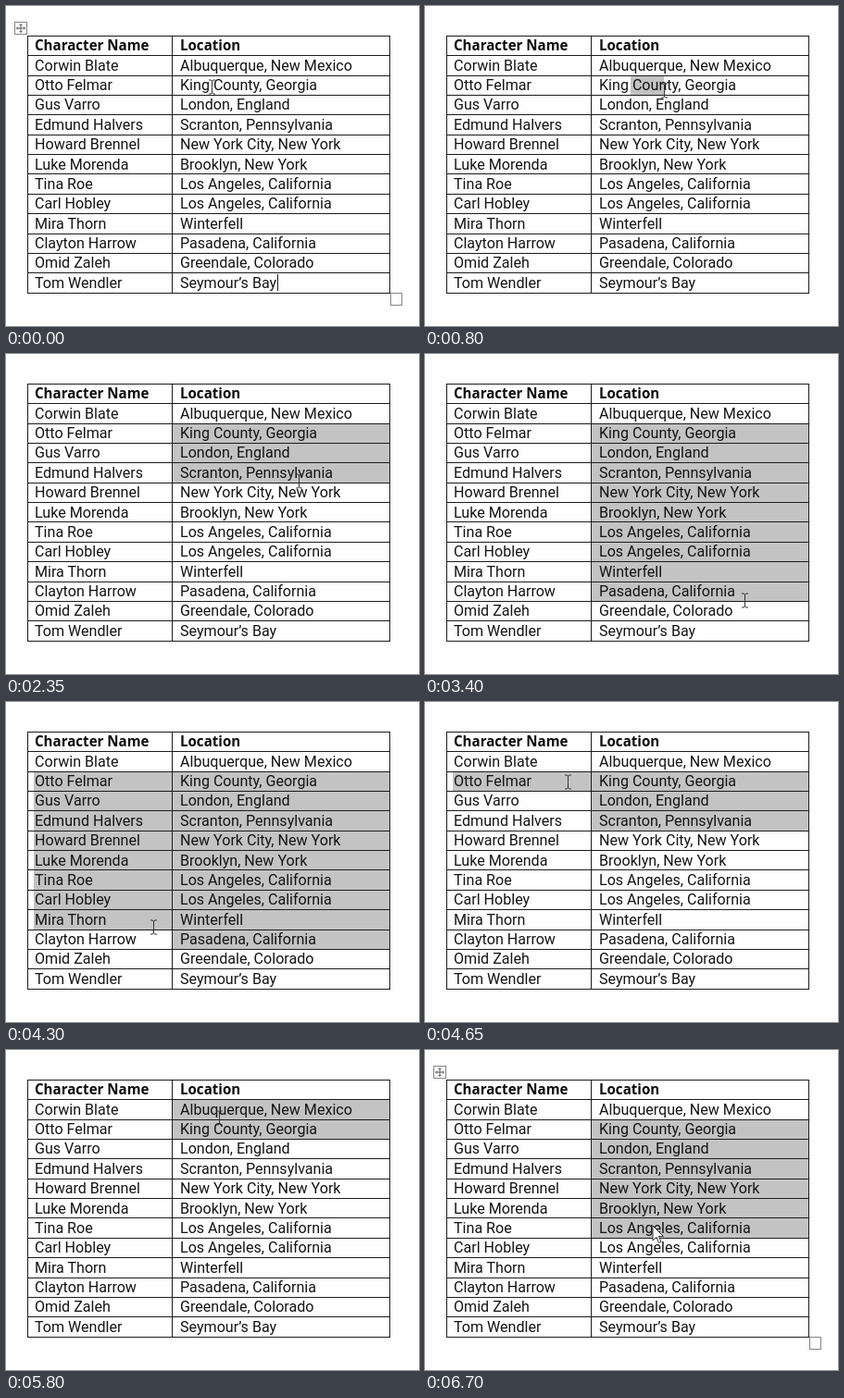
Animation, 446 px wide and 346 px high, one loop 7700 ms. Source, as an HTML page:

```html
<!DOCTYPE html>
<html lang="en">
<head>
<meta charset="utf-8">
<title>Selecting table cells</title>
<style>
  html, body { margin: 0; width: 100%; height: 100%; overflow: hidden; background: #fefefe; }
  svg { display: block; }
  text { font: 16.08px Roboto, "Liberation Sans", sans-serif; fill: #151515; }
  .head { font: 700 15.1px "Open Sans", "Noto Sans", sans-serif; fill: #0c0c0c; }
  .line { stroke: #1c1c1c; fill: none; }
  .sel { fill: #c3c3c3; }
</style>
</head>
<body>
<svg width="446" height="346" viewBox="0 0 446 346">
  <defs>
    <path id="arm" d="M0 0V-4.5M-1.5 -3L0 -4.5L1.5 -3"/>
    <path id="halfBeam" d="M0 0V-6.5M-3.5 -7.5H-1.5L0 -6.5L1.5 -7.5H3.5"/>
  </defs>
  <g class="sel"><rect id="leftSel"/><rect id="rightSel"/></g>
  <path id="grid" class="line"/>
  <g id="labels"></g>
  <path id="caret" class="line" d="M293.5 290V308"/>
  <g id="handles" fill="#fff" stroke="#858585">
    <rect x="9.5" y="17.5" width="13" height="13"/>
    <g id="cross" transform="translate(16 24)" fill="none" stroke="#555"></g>
    <rect x="415.5" y="310.5" width="12" height="13"/>
  </g>
  <g id="beam" fill="none" stroke="#333">
    <use href="#halfBeam"/><use href="#halfBeam" transform="scale(1 -1)"/>
  </g>
  <path id="arrow" d="M0 0V16L4 12.5L6.5 18.5L9 17.5L6.5 11.5H11.5Z" fill="#fff" stroke="#333"/>
</svg>
<script>
const LOOP = 7700, STEP = 50;
const TOP = 32, PITCH = 21.35, LEFT = 23, SPLIT = 179, RIGHT = 414;
const ANCHOR = { row: 2, x: 222 };
const WORD_GAP = 280, LINE_END = 336;
const CELLS_FROM = 1600, RELEASED = 6600;

const rows = [
  ["Character Name", "Location"],
  ["Corwin Blate", "Albuquerque, New Mexico"],
  ["Otto Felmar", "King County, Georgia"],
  ["Gus Varro", "London, England"],
  ["Edmund Halvers", "Scranton, Pennsylvania"],
  ["Howard Brennel", "New York City, New York"],
  ["Luke Morenda", "Brooklyn, New York"],
  ["Tina Roe", "Los Angeles, California"],
  ["Carl Hobley", "Los Angeles, California"],
  ["Mira Thorn", "Winterfell"],
  ["Clayton Harrow", "Pasadena, California"],
  ["Omid Zaleh", "Greendale, Colorado"],
  ["Tom Wendler", "Seymour’s Bay"]
];

// Turning points of the drag
const stops = [
  { t: 0, x: 222, y: 87 },
  { t: 1600, x: 294, y: 95 },
  { t: 2350, x: 316, y: 137 },
  { t: 3400, x: 345, y: 266 },
  { t: 3800, x: 345, y: 266 },
  { t: 4300, x: 159, y: 243 },
  { t: 4750, x: 152, y: 41 },
  { t: 5350, x: 226, y: 45 },
  { t: 5750, x: 229, y: 64 },
  { t: 6450, x: 246, y: 190 }
];

const el = id => document.getElementById(id);
const clamp = (v, lo, hi) => Math.max(lo, Math.min(hi, v));
const lineY = k => Math.round(TOP + PITCH * k);
const rowAt = y => clamp(Math.floor((y - TOP) / PITCH), 0, rows.length - 1);
const show = (id, on) => el(id).setAttribute("visibility", on ? "visible" : "hidden");
const moveTo = (id, x, y) => el(id).setAttribute("transform", `translate(${x} ${y})`);

function add(parent, tag, attrs) {
  const node = document.createElementNS("http://www.w3.org/2000/svg", tag);
  setAll(node, attrs);
  return parent.appendChild(node);
}

function setAll(node, attrs) {
  for (const name in attrs) node.setAttribute(name, attrs[name]);
}

function pointerAt(t) {
  const next = stops.findIndex(s => s.t > t);
  if (next < 0) return stops[stops.length - 1];
  const a = stops[next - 1], b = stops[next];
  const u = (t - a.t) / (b.t - a.t);
  return { x: a.x + (b.x - a.x) * u, y: a.y + (b.y - a.y) * u };
}

function selectRows(id, x0, x1, row) {
  const y = lineY(Math.min(row, ANCHOR.row));
  const bottom = lineY(Math.max(row, ANCHOR.row) + 1);
  setAll(el(id), { x: x0, y, width: Math.max(0, x1 - x0), height: bottom - y });
}

function build() {
  let d = "";
  for (let k = 0; k <= rows.length; k++) d += `M${LEFT} ${lineY(k) + .5}H${RIGHT + 1}`;
  for (const x of [LEFT, SPLIT, RIGHT]) d += `M${x + .5} ${TOP}V${lineY(rows.length)}`;
  el("grid").setAttribute("d", d);

  rows.forEach((cells, k) => cells.forEach((label, col) => {
    add(el("labels"), "text", {
      x: (col ? SPLIT + 1 : LEFT) + 8,
      y: Math.round(48.4 + PITCH * k),
      class: k ? "body" : "head"
    }).textContent = label;
  }));

  for (let a = 0; a < 360; a += 90) add(el("cross"), "use", { href: "#arm", transform: `rotate(${a})` });
}

function draw(t) {
  const p = pointerAt(t);
  const inCells = t > CELLS_FROM;
  const bothColumns = inCells && p.x < SPLIT;

  if (inCells) {
    // With both columns selected, the right one repaints two steps later
    const seen = bothColumns ? pointerAt(t - 2 * STEP) : p;
    selectRows("rightSel", SPLIT, RIGHT, rowAt(seen.y));
    selectRows("leftSel", LEFT + 7, SPLIT, rowAt(p.y));
  } else {
    selectRows("rightSel", ANCHOR.x, p.x < WORD_GAP ? p.x : LINE_END, ANCHOR.row);
  }
  show("leftSel", bothColumns);

  const fadeOut = 1 - (t - STEP) / 150;
  const fadeIn = (t - RELEASED + STEP) / 100;
  el("handles").setAttribute("opacity", clamp(Math.max(fadeOut, fadeIn), 0, 1));

  show("caret", t < 2 * STEP);
  show("beam", t < RELEASED);
  show("arrow", t >= RELEASED);
  moveTo("beam", Math.round(p.x) + .5, Math.round(p.y) + .5);
  moveTo("arrow", p.x, p.y);
}

build();
const start = performance.now();
function tick() {
  const t = (performance.now() - start) % LOOP;
  draw(Math.floor(t / STEP) * STEP);
  requestAnimationFrame(tick);
}
tick();
</script>
</body>
</html>
```
